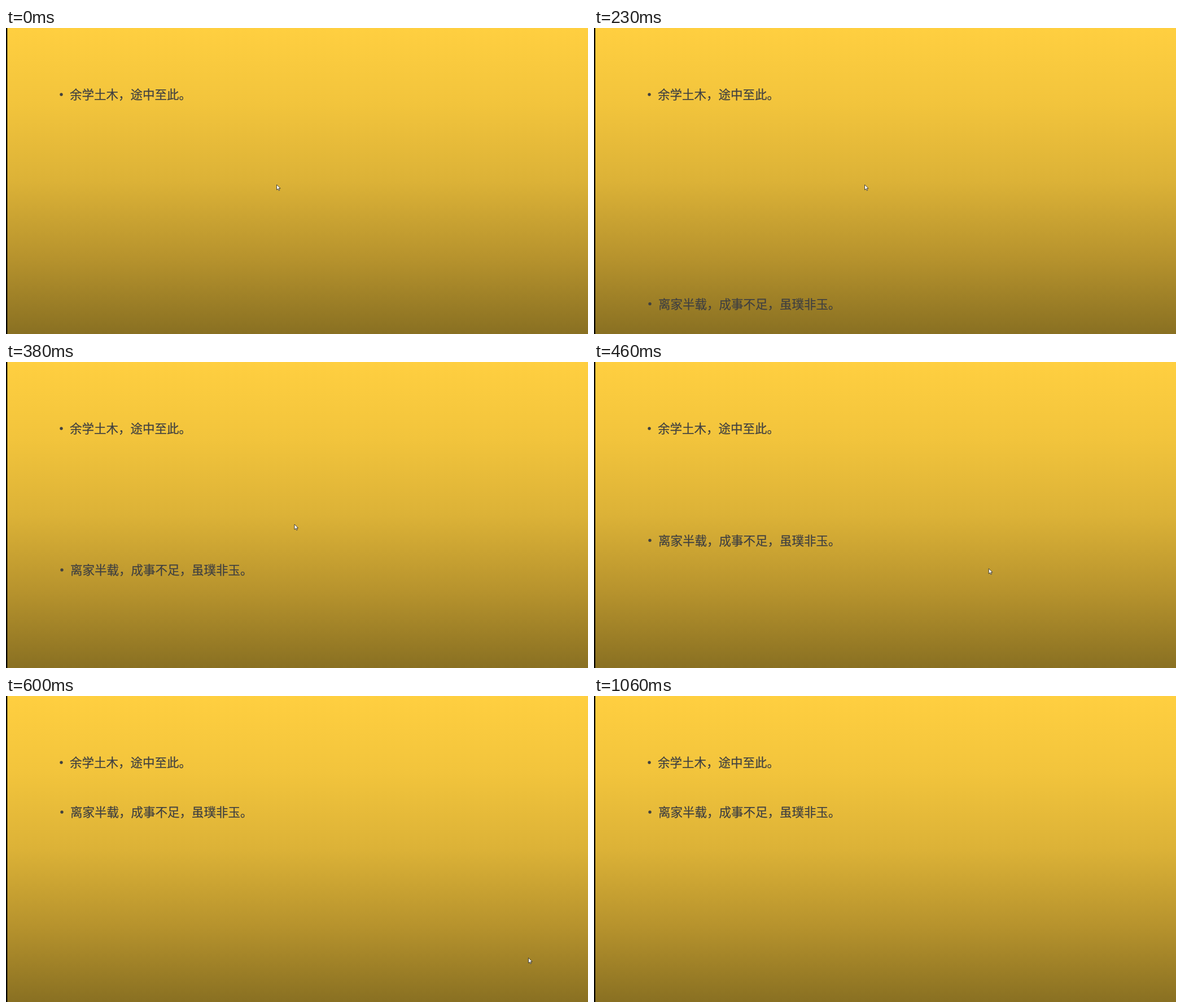
An HTML page with a canvas for the animation above (1.46 s loop, 1031 px wide and 543 px high).

```html
<!DOCTYPE html>
<html lang="zh-CN">
<head>
<meta charset="utf-8">
<style>
  html, body { margin: 0; width: 100%; height: 100%; overflow: hidden; }
  canvas { display: block; }
</style>
</head>
<body>
<canvas id="stage" width="1031" height="543"></canvas>
<script>
const ctx = document.getElementById('stage').getContext('2d');
const LOOP = 1460;
const STEP = 74; // the picture holds still within each step

// Key poses as [step, ...values], joined by straight moves
const linePath = [[0, 644], [4, 438], [5, 369], [7, 264], [8, 206]];
const cursorPath = [[4, 479.5, 278], [5, 511, 288], [7, 887.5, 445], [10, 1001.5, 504], [14, 1040, 550]];

const background = ctx.createLinearGradient(0, 0, 0, 543);
['#ffcf40', '#f2c43c', '#dcb237', '#b7932d', '#897022']
  .forEach((color, i) => background.addColorStop(i / 4, color));

const arrow = new Path2D('M0 0V16L4 12.5 6.3 18 9 17 6.6 11.5H11.5Z');

function poseAt(path, step) {
  const next = path.findIndex(key => key[0] > step);
  if (next < 0) return path[path.length - 1].slice(1);
  const to = path[next], from = path[next - 1] || to;
  const f = (step - from[0]) / (to[0] - from[0] || 1);
  return from.slice(1).map((v, i) => from === to ? v : v + (to[i + 1] - v) * f);
}

function bulletLine(text, x, y) {
  ctx.fillStyle = ctx.strokeStyle = '#404040';
  ctx.lineWidth = 0.25;
  ctx.beginPath();
  ctx.arc(x, y, 2.7, 0, Math.PI * 2);
  ctx.fill();
  ctx.fillText(text, x + 15.1, y + 8.2);
  ctx.strokeText(text, x + 15.1, y + 8.2);
}

function drawCursor(x, y) {
  ctx.save();
  ctx.translate(x, y);
  ctx.scale(0.58, 0.58);
  ctx.fillStyle = '#fff';
  ctx.strokeStyle = '#222';
  ctx.lineWidth = 1.4;
  ctx.fill(arrow);
  ctx.stroke(arrow);
  ctx.restore();
}

function draw() {
  const step = Math.floor(performance.now() % LOOP / STEP);
  ctx.fillStyle = background;
  ctx.fillRect(0, 0, 1031, 543);
  ctx.fillStyle = '#000';
  ctx.fillRect(0, 0, 2.3, 543);
  ctx.font = '21.5px "Noto Sans CJK SC", "Noto Sans CJK", sans-serif';
  bulletLine('余学土木，途中至此。', 98, 118);
  bulletLine('离家半载，成事不足，虽璞非玉。', 99, poseAt(linePath, step)[0]);
  drawCursor(...poseAt(cursorPath, step));
  requestAnimationFrame(draw);
}
draw();
</script>
</body>
</html>
```
